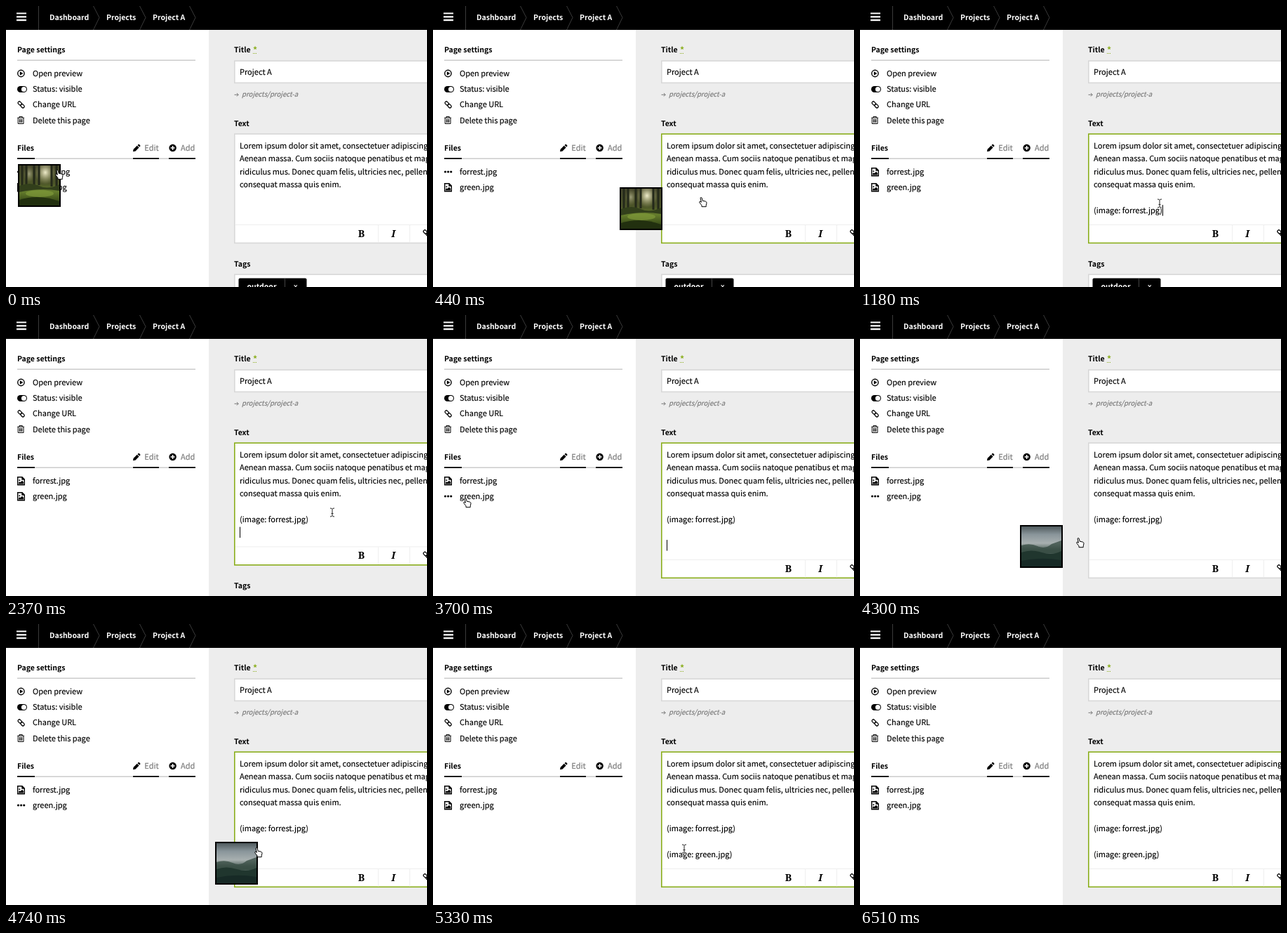
Recreate the animation shown at these times as an HTML page. Size 600 by 400 pixels, loop 7050 ms.

```html
<!DOCTYPE html>
<html lang="en">
<head>
<meta charset="utf-8">
<title>Drag files into text</title>
<style>
html, body { margin: 0; width: 100%; height: 100%; overflow: hidden; background: #fff; }
svg { display: block; width: 600px; height: 400px; }
text {
  font: 11px "Noto Sans CJK SC", "Noto Sans CJK JP", "Noto Sans CJK KR", "Noto Sans CJK TC", "Noto Sans CJK", "Open Sans", sans-serif;
  fill: currentColor; stroke: currentColor; stroke-width: .15px;
  text-rendering: geometricPrecision; white-space: pre;
}
.b { font-weight: 700; font-size: 10.5px; stroke: none; }
.serif { font: 700 14px "Noto Serif", "Liberation Serif", serif; stroke: none; text-anchor: middle; }
.hint { font-size: 9.6px; font-style: italic; }
.white { color: #fff; }
.grey { color: #777; }
.line { fill: none; stroke: #000; stroke-width: 1.4; }
.box { fill: #fff; stroke: #d8d8d8; stroke-width: 1.6; }
.focus { stroke: #8aae1c; }
.rule { stroke: #eee; }
</style>
</head>
<body>
<svg viewBox="0 0 600 400">
  <defs>
    <linearGradient id="moss" x2="0" y2="1">
      <stop offset="0" stop-color="#43442a"/><stop offset=".45" stop-color="#4c5528"/>
      <stop offset=".65" stop-color="#657d2c"/><stop offset="1" stop-color="#26360f"/>
    </linearGradient>
    <radialGradient id="glow">
      <stop offset="0" stop-color="#efeccb"/><stop offset="1" stop-color="#b5b27a" stop-opacity="0"/>
    </radialGradient>
    <linearGradient id="mist" x2="0" y2="1">
      <stop offset="0" stop-color="#505b5e"/><stop offset=".2" stop-color="#89959a"/>
      <stop offset=".42" stop-color="#a8b0b0"/><stop offset=".58" stop-color="#50635b"/>
      <stop offset="1" stop-color="#263c35"/>
    </linearGradient>
    <g id="link" class="line" transform="rotate(45)">
      <rect x="-6.2" y="-2.2" width="6.4" height="4.4" rx="2"/>
      <rect x="-.2" y="-2.2" width="6.4" height="4.4" rx="2"/>
    </g>
    <g id="file">
      <path class="line" stroke-width="1.2" d="M.7.7H7L10.3 4V11.8H.7zM7 .7V4h3.3"/>
      <path d="M2 10.4V8.8l1.5-1.5 1 1L7 5.8l2 2.2v2.4z"/><circle cx="3.3" cy="5.2" r="1"/>
    </g>
    <g id="dots"><circle cx="1.5" cy="6" r="1.6"/><circle cx="5.6" cy="6" r="1.6"/><circle cx="9.7" cy="6" r="1.6"/></g>
    <path id="chevron" d="M0 0L8.5 16.5 0 34" fill="none" stroke="#3a3a3a"/>
  </defs>

  <rect width="600" height="400" fill="#fff"/>
  <rect x="289" y="34" width="311" height="366" fill="#ededed"/>

  <rect width="600" height="34" fill="#000"/>
  <path d="M15 10.5h14M15 15.3h14M15 20.1h14" stroke="#fff" stroke-width="2.2"/>
  <path d="M46.5 0V34" stroke="#3a3a3a"/>
  <g class="b white">
    <text class="b" x="62" y="20">Dashboard</text>
    <text class="b" x="143" y="20">Projects</text>
    <text class="b" x="209" y="20">Project A</text>
  </g>
  <use href="#chevron" x="124.5"/><use href="#chevron" x="190.5"/><use href="#chevron" x="261.5"/>

  <text class="b" x="16" y="66">Page settings</text>
  <path d="M16 77.2H270M16 217.2H270" stroke="#ccc" stroke-width="1.6"/>
  <path d="M16 217.2H41M181 217.2H218M232 217.2H270" stroke="#000" stroke-width="1.8"/>

  <circle class="line" cx="21.4" cy="96" r="4.7"/>
  <path d="M19.8 93.3L24.4 96 19.8 98.7z"/>
  <rect x="16" y="114" width="14" height="9" rx="4.5"/><circle cx="25.4" cy="118.5" r="3.5" fill="#fff"/>
  <use href="#link" x="0" y="0" transform="translate(21.6 140.4) scale(.9)"/>
  <path class="line" style="stroke-width:1" d="M16.2 159.2h9.8M19 159v-1.6h4.2V159M17.2 159.5v8h7.8v-8M19.4 161v5M21.1 161v5M22.8 161v5"/>
  <text x="38" y="100">Open preview</text>
  <text x="38" y="122.2">Status: visible</text>
  <text x="38" y="144.4">Change URL</text>
  <text x="38" y="166.8">Delete this page</text>

  <text class="b" x="16" y="206">Files</text>
  <path d="M181 207.3l.6-3.4 5.2-5.2 2.8 2.8-5.2 5.2zM187.5 198l1.2-1.1q.6-.4 1.2.1l1.4 1.4q.5.6 0 1.2l-1.1 1.1z"/>
  <circle cx="237.6" cy="202" r="5.2"/><path d="M234.6 202h6M237.6 199v6" stroke="#fff" stroke-width="1.6"/>
  <g class="grey"><text x="197.3" y="206">Edit</text><text x="249" y="206">Add</text></g>

  <use id="icon1" x="16" y="230"/><text x="38" y="240">forrest.jpg</text>
  <use id="icon2" x="16" y="252"/><text x="38" y="262.2">green.jpg</text>

  <text class="b" x="325" y="66">Title</text>
  <text class="b" x="352" y="66.5" style="color:#8aae1c;font-size:12px">*</text>
  <path d="M352 67.5h6" stroke="#8aae1c" stroke-dasharray="1 1"/>
  <rect class="box" x="325.8" y="78.2" width="290" height="31.2"/>
  <text x="333" y="98">Project A</text>
  <path d="M325.5 126.3h5.6M328.9 124l2.3 2.3-2.3 2.3" fill="none" stroke="#777"/>
  <text class="hint grey" x="336" y="129">projects/project-a</text>

  <text class="b" x="325" y="171">Text</text>
  <rect id="field" class="box" x="325.8" y="182.2" width="290" height="155.2"/>
  <text x="333" y="203">Lorem ipsum dolor sit amet, consectetuer adipiscing elit.</text>
  <text x="333" y="221.4">Aenean massa. Cum sociis natoque penatibus et magnis dis</text>
  <text x="333" y="239.9">ridiculus mus. Donec quam felis, ultricies nec, pellentesque</text>
  <text x="333" y="258.3">consequat massa quis enim.</text>
  <text id="tag1" x="333" y="295.2">(image: forrest.jpg)</text>
  <text id="tag2" x="333" y="332">(image: green.jpg)</text>
  <path id="caret" d="M0-12V3.5" stroke="#000"/>

  <g id="below">
    <path class="rule" d="M327 311.5H600M530.5 312V336.5M575.5 312V336.5"/>
    <text class="serif" x="506.5" y="329">B</text>
    <text class="serif" x="552" y="329" font-style="italic" style="font-style:italic">I</text>
    <use href="#link" transform="translate(599.5 323.5) scale(.9)"/>
    <text class="b" x="325" y="371">Tags</text>
    <rect class="box" x="325.8" y="382.2" width="290" height="40"/>
    <rect x="331.5" y="387.5" width="97" height="24" rx="2"/>
    <path d="M397.5 388V411" stroke="#444"/>
    <g class="white"><text class="b" x="343.5" y="403">outdoor</text><text x="410" y="402.5">x</text></g>
  </g>

  <g id="forest">
    <rect width="61" height="61"/>
    <svg x="2" y="2" width="57" height="57">
      <rect width="57" height="57" fill="url(#moss)"/>
      <ellipse cx="37" cy="10" rx="15" ry="17" fill="url(#glow)"/>
      <ellipse cx="14" cy="12" rx="8" ry="12" fill="url(#glow)" opacity=".5"/>
      <path d="M4 0V33M10 0V30M21 0V32M28 0V28M46 0V30M53 0V34" stroke="#24291a" stroke-width="3"/>
      <path d="M0 29Q15 23 28 29T57 27V36Q30 31 0 38z" fill="#323f1b"/>
      <ellipse cx="29" cy="40" rx="20" ry="5" fill="#7f9b3a" opacity=".7"/>
      <path d="M0 49Q28 40 57 51V57H0z" fill="#22300f"/>
    </svg>
  </g>
  <g id="hills">
    <rect width="61" height="61"/>
    <svg x="2" y="2" width="57" height="57">
      <rect width="57" height="57" fill="url(#mist)"/>
      <path d="M0 27Q12 23 23 28T43 25L57 20V38H0z" fill="#344a40" opacity=".75"/>
      <path d="M0 37Q14 32 29 37T57 35V57H0z" fill="#20362e"/>
      <path d="M0 49Q28 43 57 48V57H0z" fill="#172a26"/>
    </svg>
  </g>

  <path id="hand" fill="#fff" stroke="#000" stroke-linejoin="round"
    d="M-4-5.8q1.1-1.4 2.2 0l1 4 4.2.9q1.8.6 1.6 2.4l-.8 3.3v1.9h-6.2v-1.9l-3.2-4.1q-.4-1.7 1.2-1.5l1.4 1.1z"/>
  <g id="beam" fill="none">
    <path d="M-3-6Q-.3-6 0-4.6 .3-6 3-6M0-4.6V4.6M-3 6Q-.3 6 0 4.6 .3 6 3 6M-1.5 1.6h3" stroke="#fff" stroke-width="2.4" opacity=".7"/>
    <path d="M-3-6Q-.3-6 0-4.6 .3-6 3-6M0-4.6V4.6M-3 6Q-.3 6 0 4.6 .3 6 3 6M-1.5 1.6h3" stroke="#222"/>
  </g>
</svg>
<script>
const LOOP = 7050, LINE = 18.45;
const $ = id => document.getElementById(id);

// Pointer steps: time, x, y, shape
const steps = [
  [0, 76, 240, "forest"], [140, 112, 247, "forest"], [290, 235, 264, "forest"],
  [440, 385, 279, "forest"], [580, 427, 281, "forest"],
  [1180, 427, 281, "beam"], [1780, 434, 281, "beam"], [1930, 454, 281, "beam"], [2070, 465, 281, "beam"],
  [2970, 440, 280, "beam"], [3120, 345, 275, "beam"], [3260, 205, 268, "hand"],
  [3410, 100, 264, "hand"], [3550, 60, 266, "hand"], [3700, 49, 267, "hand"],
  [3850, 76, 270, "hills"], [4000, 150, 282, "hills"], [4150, 246, 299, "hills"], [4300, 314, 324, "hills"],
  [4440, 340, 326, "hills"], [4590, 353, 325, "hills"], [4740, 360, 325, "hills"],
  [4890, 361, 326, "beam"], [5190, 360, 324, "beam"], [5330, 358, 320, "beam"], [5630, 364, 325, "beam"],
  [5920, 392, 337, "beam"], [6070, 470, 367, "beam"], [6210, 550, 358, "beam"], [6510, 0, 0, ""]
];

const show = (id, on) => $(id).setAttribute("visibility", on ? "visible" : "hidden");
const move = (id, x, y) => $(id).setAttribute("transform", `translate(${x} ${y})`);
const within = (t, ...spans) => spans.some(([a, b]) => t >= a && t < b);

function drawPointer(t) {
  const i = steps.findLastIndex(s => s[0] <= t);
  const [, x, y, shape] = steps[i];
  const [, px, py] = steps[Math.max(0, i - 1)];
  const dragging = shape === "forest" || shape === "hills";
  for (const id of ["forest", "hills", "beam"]) show(id, id === shape);
  show("hand", shape === "hand" || dragging);
  move("hand", x, y);
  move("beam", x, y);
  // the dragged picture trails the pointer
  if (dragging) move(shape, Math.round(x - 59 - .4 * (x - px)), Math.round(y - 15 - .4 * (y - py)));
}

function drawField(t) {
  const extra = t < 2370 ? 0 : t < 2520 ? 1 : 2;
  $("field").setAttribute("height", 155.2 + extra * LINE);
  $("field").classList.toggle("focus", within(t, [440, 3850], [4440, LOOP]));
  move("below", 0, extra * LINE);
  show("tag1", t >= 1180);
  show("tag2", t >= 4890);
  show("caret", within(t, [1180, 1780], [2370, 3120], [3700, 3850], [4890, 5330], [5920, 6510]));
  move("caret", t < 2370 ? 431.5 : t < 4890 ? 333.5 : 427, 295.2 + extra * LINE);
}

function frame(now) {
  const t = now % LOOP;
  drawPointer(t);
  drawField(t);
  $("icon1").setAttribute("href", t < 1180 ? "#dots" : "#file");
  $("icon2").setAttribute("href", within(t, [3700, 4890]) ? "#dots" : "#file");
}

const start = performance.now();
(function tick() {
  frame(performance.now() - start);
  requestAnimationFrame(tick);
})();
</script>
</body>
</html>
```
